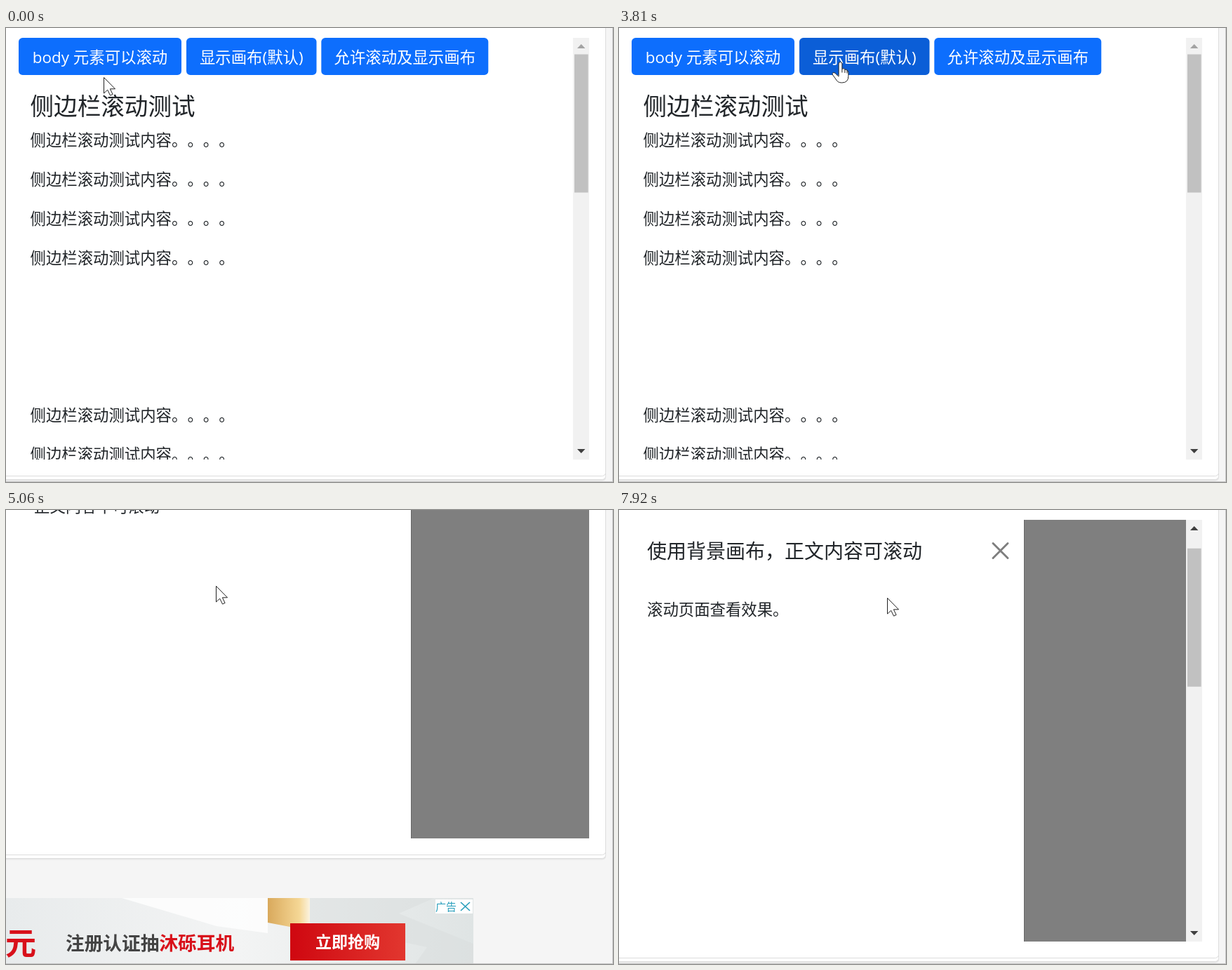
Recreate the animation shown at these times as an HTML page. Size 865 by 647 pixels, loop 7990 ms.

```html
<!DOCTYPE html>
<html lang="zh-CN">
<head>
<meta charset="utf-8">
<title>侧边栏滚动</title>
<style>
  html, body { margin: 0; width: 100%; height: 100%; overflow: hidden; background: #f5f5f5; }
  svg { display: block; width: 100%; height: 100%; }
  text {
    font: 22.4px "Open Sans", "Noto Sans CJK SC", "Noto Sans CJK", sans-serif;
    fill: #212529; white-space: pre;
    text-spacing-trim: space-all; font-feature-settings: "chws" 0, "halt" 0;
  }
  .btn rect { fill: #0d6efd; }
  .btn.hover rect { fill: #0b5ed7; }
  .btn text { fill: #fff; }
  .h1 { font-size: 33.6px; }
  .h2 { font-size: 28px; }
  .ad { font-size: 26.7px; font-weight: 700; fill: #444; }
  .pointer path { fill: #fff; stroke: #222; stroke-linejoin: round; }
</style>
</head>
<body>
<svg viewBox="0 0 865 647">
  <defs>
    <clipPath id="view"><rect x="18" y="14" width="813" height="601"/></clipPath>
    <clipPath id="banner"><rect x="0" y="700" width="666" height="126"/></clipPath>
    <linearGradient id="sky"><stop stop-color="#e8ebec"/><stop offset=".5" stop-color="#f3f4f4"/><stop offset="1" stop-color="#dfe4e4"/></linearGradient>
    <linearGradient id="gold"><stop stop-color="#d9a95c"/><stop offset=".75" stop-color="#f5d795"/><stop offset="1" stop-color="#fbf3e0"/></linearGradient>
    <linearGradient id="red"><stop stop-color="#cf0710"/><stop offset="1" stop-color="#e2372f"/></linearGradient>
  </defs>
  <rect width="865" height="647" fill="#f5f5f5"/>

  <g id="page">
    <rect x="-20" y="-320" width="875" height="965.500" rx="5" fill="#e6e6e6"/>
    <rect x="-20" y="-320" width="874.500" height="963.500" rx="5" fill="#fff" stroke="#dedede"/>
    <rect x="-20" y="-320" width="874.500" height="958.500" rx="5" fill="#fff" stroke="#dcdcdc"/>

    <g clip-path="url(#banner)">
      <rect y="700" width="666" height="126" fill="url(#sky)"/>
      <path d="M165 700H373V750L300 740Z" fill="#fff" opacity=".8"/>
      <path d="M433 700H610L560 722L666 765V826H560L600 770L433 735Z" fill="#d9dddd" opacity=".5"/>
      <path d="M373 700H433V736L415 743L373 735Z" fill="url(#gold)"/>
      <text x="-1" y="781" class="ad" style="font-size:44px;fill:#d8101a">元</text>
      <text x="85" y="774" class="ad">注册认证抽<tspan fill="#d8101a">沐砾耳机</tspan></text>
      <rect x="405" y="736" width="164" height="53" fill="url(#red)"/>
      <text x="441" y="771" class="ad" style="font-size:23px;fill:#fff">立即抢购</text>
      <rect x="612" y="702" width="53" height="20" fill="#fff"/>
      <text x="612" y="718" style="font-size:15px;fill:#2a9fbc">广告</text>
      <path d="M648 706L661 718M661 706L648 718" stroke="#2a9fbc" stroke-width="1.700"/>
    </g>

    <g clip-path="url(#view)">
      <g id="content"></g>
      <rect id="backdrop" x="18" y="14" width="813" height="601"/>
      <g id="scrollbar">
        <rect x="808" y="14" width="23" height="601" fill="#f1f1f1"/>
        <rect id="thumb" x="810" y="37.500" width="19.600" height="197" fill="#c1c1c1"/>
        <path id="up" d="M814 29L819.700 23L825.400 29Z"/>
        <path d="M814 600L819.700 606L825.400 600Z" fill="#404040"/>
      </g>
      <g id="panel">
        <rect x="18" y="14" width="559" height="601" fill="#fff"/>
        <rect x="577" y="14" width="1" height="601" opacity=".2"/>
        <text id="title" class="h2" x="40" y="68.500"></text>
        <text id="note" x="40" y="149.500"></text>
        <rect id="ring" x="518.700" y="32.800" width="50.400" height="50.400" rx="8.400" fill="none" stroke="#c2dbfe" stroke-width="5.600"/>
        <path id="cross" d="M533 47.500L554 68.500M554 47.500L533 68.500" stroke="#000" stroke-width="2.900" stroke-linecap="round"/>
      </g>
    </g>
  </g>

  <path d="M864.500 0V647M0 646.500H865" stroke="#c4c4c4"/>
  <g id="pointer" class="pointer">
    <path id="arrow" d="M0 0V22.500L5.200 17.700L9 25.600L12.600 24L8.900 16.300H16Z"/>
    <g id="hand">
      <path d="M-2.400 17.500V2.400Q-2.400 0 0 0T2.400 2.400V9.800Q5 8 6.400 10.800Q9 9.600 9.500 12.300Q11.400 12 11.400 15V20Q11.400 29.500 2 29.500Q-4 29.500-6.500 24.500L-10.800 18.500Q-12.500 15.500-9.500 15Q-7.500 14.800-5.500 18L-2.400 20.500Z"/>
      <path d="M2.400 9.800V15M6.400 10.800V15.500M9.500 12.300V16" fill="none"/>
    </g>
  </g>
</svg>

<script>
const LOOP = 7990, STEP = 68.29, WHEEL = 140, PANEL_WIDTH = 560;
const $ = id => document.getElementById(id);
const set = (id, name, value) => $(id).setAttribute(name, value);
const show = (id, on) => set(id, "visibility", on ? "inherit" : "hidden");
const move = (id, x, y) => set(id, "transform", `translate(${x} ${y})`);
const within = (t, spans) => spans.some(([from, to]) => t >= from && t < to);

const buttons = [
  { x: 18, w: 232, label: "body 元素可以滚动", hover: [[200, 800]] },
  { x: 257, w: 185.500, label: "显示画布(默认)", hover: [[3480, 4030]] },
  { x: 449.300, w: 238, label: "允许滚动及显示画布", hover: [[3150, 3400], [6320, 6760]] },
];
const line = (y, label, cls = "") => `<text x="34.500" y="${y}" class="${cls}">${label}</text>`;
const rows = [0, 1, 2, 3, 7, 8, 9, 10, 11, 12];
$("content").innerHTML =
  buttons.map(b => `<g class="btn"><rect x="${b.x}" y="14" width="${b.w}" height="53" rx="5.600"/>
    <text x="${b.x + b.w / 2}" y="50" text-anchor="middle">${b.label}</text></g>`).join("") +
  line(123.500, "侧边栏滚动测试", "h1") +
  rows.map(i => line(168 + 56 * i, "侧边栏滚动测试内容。。。。")).join("");
const buttonNodes = [...document.querySelectorAll(".btn")];

const panels = [
  { until: 3600, title: "正文内容可以滚动", note: "滚动页面查看效果。" },
  { until: 6560, title: "使用背景画布", note: "正文内容不可滚动" },
  { until: LOOP, title: "使用背景画布，正文内容可滚动", note: "滚动页面查看效果。" },
];

// Tables of [time, value...]
const slide = [[680, 0], [980, 1], [3010, 1], [3310, 0], [3880, 0], [4180, 1], [6152, 1], [6452, 0], [6690, 0], [6990, 1]];
const shade = [[3880, 0], [4030, .5], [6152, .5], [6302, 0], [6690, 0], [6840, .5]];
const innerScroll = [[1412, 0], [1632, WHEEL], [1940, WHEEL], [2160, 0], [7290, 0], [7510, 2 * WHEEL], [7775, 2 * WHEEL], [7985, 0]];
const pageScroll = [[4490, 0], [4865, 2 * WHEEL], [5253, 0]];
const pointerPath = [
  [60, 140, 70], [390, 145, 49], [2180, 145, 49], [2710, 536, 56], [3130, 536, 56], [3740, 316, 48],
  [4180, 316, 48], [4370, 300, 108], [5380, 300, 108], [5500, 285, 158], [5780, 569, 75], [5940, 545, 48],
  [6130, 545, 48], [6270, 580, 52], [6690, 580, 52], [7110, 383, 125],
];
const handTimes = [[190, 2230], [2640, 4050], [5900, 6740]];
const hoverTimes = [[2640, 2850], [5860, 6070]];
const focusTimes = [[2850, 3400], [6070, 6500]];

// cubic-bezier(.42, 0, .58, 1)
function easeInOut(x) {
  let low = 0, high = 1, s = .5;
  for (let i = 0; i < 20; i++) {
    const u = 1 - s;
    if (1.26 * s * u * u + 1.74 * s * s * u + s ** 3 < x) low = s; else high = s;
    s = (low + high) / 2;
  }
  return s * s * (3 - 2 * s);
}

function at(table, t, ease = easeInOut) {
  const next = table.findIndex(row => row[0] > t);
  if (next === 0) return table[0].slice(1);
  if (next < 0) return table[table.length - 1].slice(1);
  const a = table[next - 1], b = table[next];
  const p = ease((t - a[0]) / (b[0] - a[0]));
  return a.slice(1).map((v, i) => v + (b[i + 1] - v) * p);
}

function draw(t) {
  const [open] = at(slide, t), [scroll] = at(innerScroll, t), [pageY] = at(pageScroll, t);
  const [x, y] = at(pointerPath, t);
  const panel = panels.find(p => t < p.until) || panels[2];
  const focused = within(t, focusTimes), hand = within(t, handTimes);

  move("page", 0, -Math.round(pageY));
  move("content", 0, -Math.round(scroll));
  move("thumb", 0, scroll / 3.08);
  set("up", "fill", scroll > .5 ? "#404040" : "#a3a3a3");
  show("scrollbar", !within(t, [[3860, 6455]]));
  set("backdrop", "opacity", at(shade, t, p => p)[0]);

  move("panel", -Math.round(PANEL_WIDTH * (1 - open)), 0);
  show("panel", open > 0);
  $("title").textContent = panel.title;
  $("note").textContent = panel.note;
  show("ring", focused);
  set("cross", "opacity", focused ? 1 : within(t, hoverTimes) ? .75 : .5);

  buttonNodes.forEach((node, i) => node.classList.toggle("hover", within(t, buttons[i].hover)));
  move("pointer", Math.round(x) - .5, Math.round(y) + .5);
  show("hand", hand);
  show("arrow", !hand);
}

// Each picture is held for one step.
const start = performance.now();
function tick(now) {
  const t = Math.max(0, now - start) % LOOP;
  draw(Math.floor((t + 18) / STEP) * STEP);
  requestAnimationFrame(tick);
}
draw(0);
requestAnimationFrame(tick);
</script>
</body>
</html>
```
